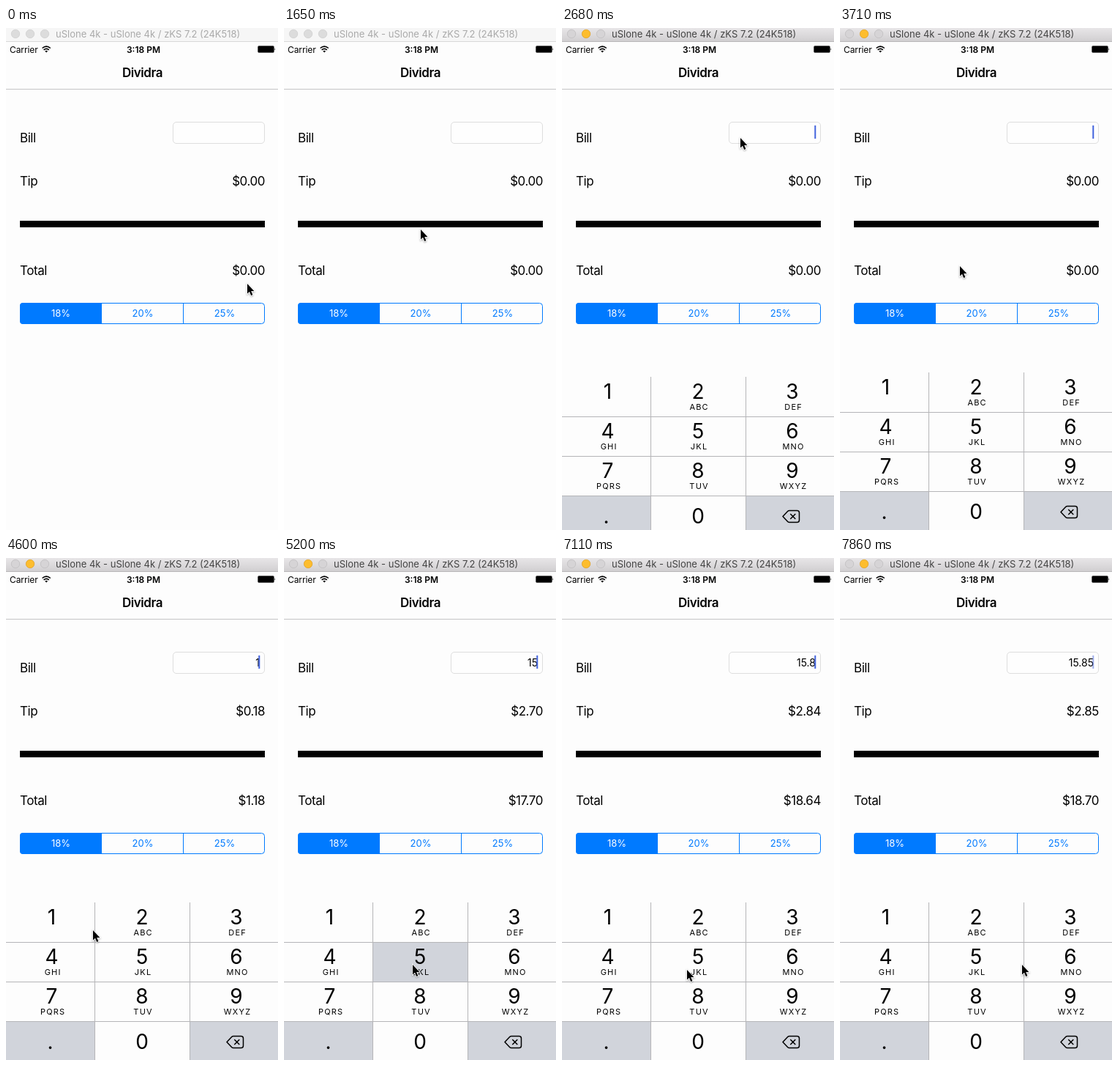
These frames come from a looping animation (372 px wide and 685 px high, 8 s). An HTML page:

```html
<!DOCTYPE html>
<html lang="en">
<head>
<meta charset="utf-8">
<title>Tip calculator</title>
<style>
  html, body { margin: 0; width: 100%; height: 100%; overflow: hidden; background: #fdfdfd; }
  svg { display: block; width: 372px; height: 685px; font-family: Inter, sans-serif; }
  .body { font-size: 17px; letter-spacing: -.45px; }
  .end { text-anchor: end; }
  .mid { text-anchor: middle; }
  .digit { font-size: 28px; text-anchor: middle; }
  .letters { font-size: 11px; letter-spacing: 1.2px; text-anchor: middle; }
</style>
</head>
<body>
<svg viewBox="0 0 372 685">
  <defs>
    <linearGradient id="chrome" x2="0" y2="1">
      <stop stop-color="#e8e6e8"/><stop offset="1" stop-color="#d1cfd1"/>
    </linearGradient>
  </defs>
  <rect width="372" height="685" fill="#fdfdfd"/>

  <!-- window title bar -->
  <rect id="bar" width="372" height="18"/>
  <rect id="barLine" y="18" width="372" height="1"/>
  <g stroke-width=".8">
    <circle class="dot" cx="13" cy="8" r="5.7"/>
    <circle class="dot" cx="33" cy="8" r="5.7"/>
    <circle class="dot" cx="53" cy="8" r="5.7"/>
  </g>
  <text id="windowTitle" x="68" y="13" font-size="13">uSlone 4k - uSlone 4k / zKS 7.2 (24K518)</text>

  <!-- status and navigation bars -->
  <text x="5" y="33.5" font-size="12" letter-spacing="-.1">Carrier</text>
  <g fill="none" stroke="#000" stroke-width="1.6">
    <path d="M49.6 27.5Q55.2 22.7 60.8 27.5M51.6 29.9Q55.2 26.8 58.8 29.9"/>
    <path d="M55.2 33.6l-1.9-2.1q1.9-1.5 3.8 0z" fill="#000" stroke="none"/>
  </g>
  <text class="mid" x="188" y="33.5" font-size="12" font-weight="600">3:18 PM</text>
  <rect x="344.5" y="24.5" width="22" height="9" rx="1.5" fill="#000" stroke="#555" stroke-width=".8"/>
  <path d="M367.5 27.2q1.6 1.8 0 3.6z"/>
  <text class="body mid" x="186.5" y="67" font-weight="600">Dividra</text>
  <rect y="83" width="372" height="1" fill="#c4c4c6"/>

  <!-- form -->
  <g class="body">
    <text x="19" y="155.5">Bill</text>
    <text x="19" y="214.5">Tip</text>
    <text x="19" y="336.5">Total</text>
    <text id="tip" class="end" x="354" y="214.5"></text>
    <text id="total" class="end" x="354" y="336.5"></text>
  </g>
  <rect x="228.5" y="128.5" width="125" height="29" rx="4.5" fill="#fefefe" stroke="#dedede"/>
  <text id="bill" class="end" x="347" y="148" font-size="14"></text>
  <rect id="caret" x="345.3" y="133" width="2" height="18" fill="#4263dd"/>
  <rect x="19" y="263" width="335" height="9"/>
  <rect x="19.5" y="375.5" width="334" height="28" rx="4" fill="none" stroke="#007aff"/>
  <path d="M131 375H23q-4 0-4 4v21q0 4 4 4h108zM242 375h1v29h-1z" fill="#007aff"/>
  <g class="mid" font-size="13" fill="#007aff">
    <text x="75" y="394.3" fill="#fff">18%</text>
    <text x="187" y="394.3">20%</text>
    <text x="299" y="394.3">25%</text>
  </g>

  <g id="keyboard"></g>
  <path id="cursor" d="M0 0V13.6L3 10.8 5.2 16 7.4 15 5.2 10H9.4Z" stroke="#fff" stroke-width="1.6"
        paint-order="stroke" style="filter:drop-shadow(0 1px 1px #0005)"/>
</svg>
<script>
const LOOP = 8000, STEPS = 54, KEYBOARD_TOP = 470;
const $ = id => document.getElementById(id);
const GREY = '#d1d4db', WHITE = '#fdfdfd';

const path = [
  [0, 330, 349], [1, 186, 278], [10, 186, 278], [11, 187, 275], [14, 244, 150],
  [22, 244, 150], [28, 84, 500], [30, 84, 500], [31, 119, 508], [33, 176, 555],
  [35, 176, 555], [37, 52, 674], [40, 52, 674], [44, 178, 606], [46, 178, 606],
  [48, 171, 562], [50, 171, 562], [52, 235, 554], [53, 249, 555]
];
const ACTIVATE = 14, FOCUS = 15;
const edits = [[FOCUS, ''], [30, '1'], [35, '15'], [39, '15.'], [45, '15.8'], [49, '15.85']];
const presses = [[30, 30, '1'], [34, 35, '5'], [38, 38, '.'], [44, 45, '8'], [49, 49, '5']];

const letters = ['', 'ABC', 'DEF', 'GHI', 'JKL', 'MNO', 'PQRS', 'TUV', 'WXYZ'];
const columns = [[0, 121, 62.5], [121, 130, 186], [251, 121, 315]];
const keys = [...'123456789.0<'];

function buildKeyboard() {
  let cells = '', labels = '';
  keys.forEach((key, i) => {
    const [x, width, center] = columns[i % 3];
    const row = Math.floor(i / 3), y = row * 54;
    cells += `<rect data-key="${key}" x="${x}" y="${y}" width="${width}" height="54"/>`;
    if (key === '<') return;
    labels += `<text class="digit" x="${key === '.' ? 60.5 : center}" y="${row === 3 ? 199.5 : y + 30}">${key}</text>`;
    if (letters[i]) labels += `<text class="letters" x="${center + 1.6}" y="${y + 45}">${letters[i]}</text>`;
  });
  $('keyboard').innerHTML = cells +
    '<path d="M0 54.5H372M0 108.5H372M0 162.5H372M121.5 0V216M251.5 0V216" stroke="#b5b5b8"/>' + labels +
    `<path d="M302 190.5l6.6-7q1-1 2.400-1H321.500q3 0 3 3v10q0 3-3 3H311q-1.400 0-2.400-1z
      M312.300 187l7 7m0-7l-7 7" fill="none" stroke="#000" stroke-width="1.5" stroke-linejoin="round"/>`;
}

function cursorAt(k) {
  const next = path.findIndex(p => p[0] >= k);
  if (next < 1) return path[0].slice(1);
  const [k0, x0, y0] = path[next - 1], [k1, x1, y1] = path[next];
  const u = (k - k0) / (k1 - k0), e = u * u * (3 - 2 * u);
  return [x0 + (x1 - x0) * e, y0 + (y1 - y0) * e];
}

function caretOpacity(age) {
  const phase = age % 6.75;
  return phase >= 5.5 ? 1 : Math.max(0, Math.min(1, 4.5 - phase));
}

function drawWindow(active) {
  $('bar').setAttribute('fill', active ? 'url(#chrome)' : '#f6f6f6');
  $('barLine').setAttribute('fill', active ? '#b8b6b8' : '#d8d8d8');
  $('windowTitle').setAttribute('fill', active ? '#444' : '#aaa');
  document.querySelectorAll('.dot').forEach((dot, i) => {
    const lit = active && i === 1;
    dot.setAttribute('fill', lit ? '#fdbd2e' : active ? '#d6d4d6' : '#dcdcdc');
    dot.setAttribute('stroke', lit ? '#e0a32a' : active ? '#c1bfc1' : '#d0d0d0');
  });
}

function draw(time) {
  const k = Math.min(STEPS - 1, Math.floor((time + 3) * STEPS / LOOP));
  drawWindow(k >= ACTIVATE);

  const edit = edits.filter(e => e[0] <= k).pop();
  const bill = edit ? edit[1] : '', amount = Number(bill);
  $('bill').textContent = bill;
  $('tip').textContent = '$' + (amount * .18).toFixed(2);
  $('total').textContent = '$' + (amount * 1.18).toFixed(2);
  $('caret').setAttribute('opacity', edit ? caretOpacity(k - edit[0]) : 0);

  const drop = k <= FOCUS ? 215 : k > 18 ? 0 : Math.round(215 * 5 ** (15.8 - k));
  $('keyboard').setAttribute('transform', `translate(0 ${KEYBOARD_TOP + drop})`);
  const press = presses.find(p => p[0] <= k && k <= p[1]);
  document.querySelectorAll('[data-key]').forEach(cell => {
    const key = cell.dataset.key, grey = key === '.' || key === '<';
    const pressed = Boolean(press) && press[2] === key;
    cell.setAttribute('fill', grey !== pressed ? GREY : WHITE);
  });

  $('cursor').setAttribute('transform', `translate(${cursorAt(k)})`);
}

buildKeyboard();
const start = performance.now();
function tick() {
  draw((performance.now() - start) % LOOP);
  requestAnimationFrame(tick);
}
tick();
</script>
</body>
</html>
```
